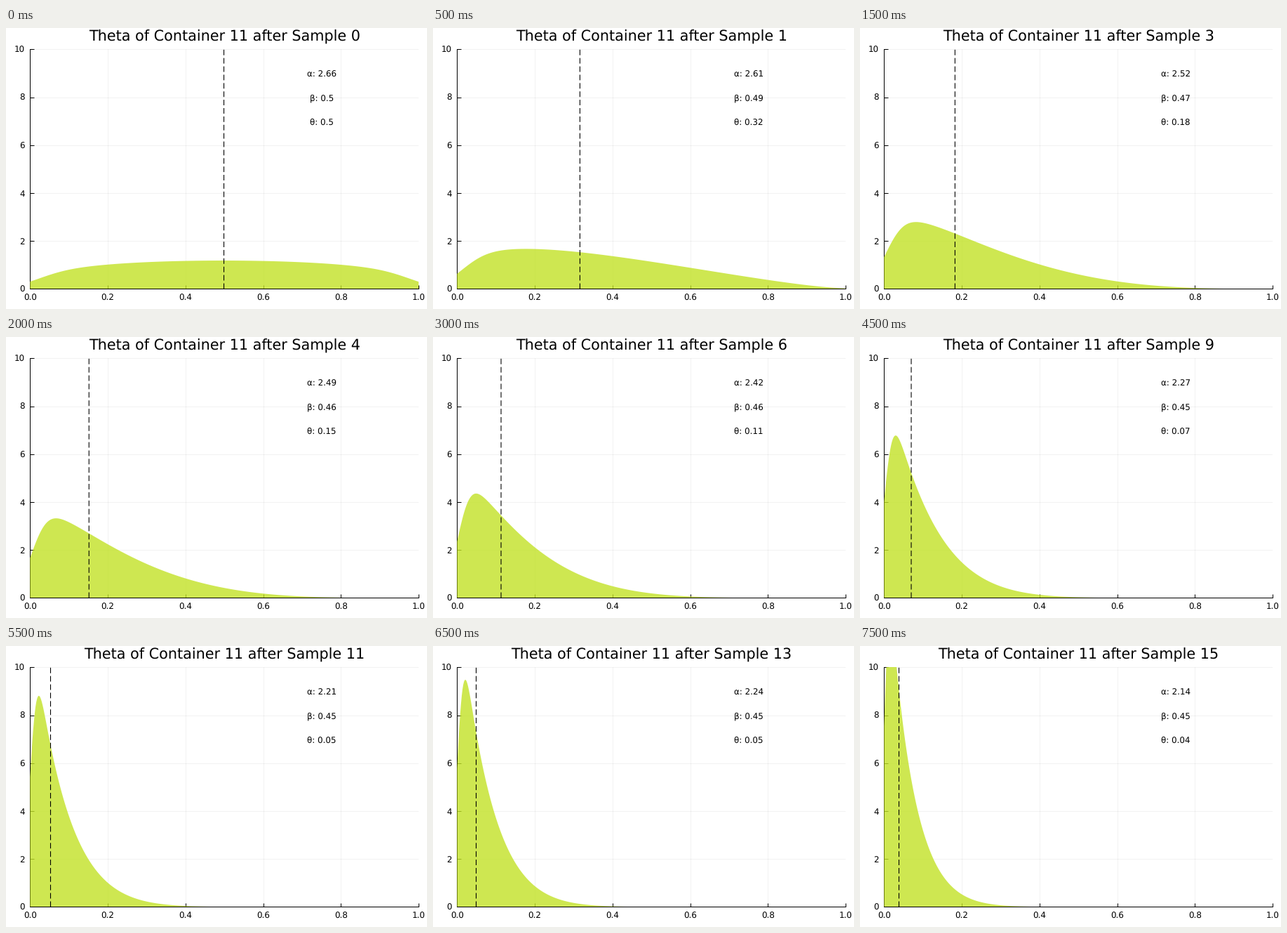
Animation of 600x400 px, one loop 8000 ms. Source, as a matplotlib script:

```python
import numpy as np
import matplotlib.pyplot as plt
from matplotlib.animation import FuncAnimation

W, H, DPI = 600, 400, 100
STEPS, STEP_MS = 16, 500
PT = 72 / DPI  # points per pixel
LEFT, RIGHT, TOP, BOTTOM = 34.3, 588.2, 30.4, 371.4

plt.rcParams.update({
    "font.family": "DejaVu Sans",
    "font.size": 11.85 * PT,
    "text.hinting": "none",
})

# Key points of the parameter estimates; the rest is interpolated.
SAMPLES = [0, 3, 6, 9, 11, 13, 15]
ALPHA = [2.66, 2.52, 2.42, 2.27, 2.21, 2.24, 2.14]
THETA = np.array([0.4987, 0.1825, 0.1132, 0.0699, 0.0527, 0.0491, 0.0383])

BANDWIDTH = 0.21  # kernel width relative to the standard deviation
CELLS = (np.arange(1200) + 0.5) / 1200
X = np.linspace(0, 1, 500)


def params(n):
    alpha = np.interp(n, SAMPLES, ALPHA)
    beta = 0.45 + 0.05 * np.exp(-n / 3)
    theta = 1 / np.interp(n, SAMPLES, 1 / THETA)
    return float(alpha), float(beta), float(theta)


def density(alpha, beta, theta):
    """Kernel-smoothed Beta(a, b) whose median lies at theta."""
    a = alpha * beta
    b = (a - 1 / 3) / theta - a + 2 / 3
    w = CELLS ** (a - 1) * (1 - CELLS) ** (b - 1)
    w /= w.sum()
    mu = w @ CELLS
    h = BANDWIDTH * np.sqrt(w @ (CELLS - mu) ** 2)
    kernel = np.exp(-((X[:, None] - CELLS) / h) ** 2 / 2)
    return kernel @ w / (h * np.sqrt(2 * np.pi))


fig = plt.figure(figsize=(W / DPI, H / DPI), dpi=DPI, facecolor="white")
ax = fig.add_axes([LEFT / W, 1 - BOTTOM / H, (RIGHT - LEFT) / W, (BOTTOM - TOP) / H])
ax.set(xlim=(0, 1), ylim=(0, 10),
       xticks=np.linspace(0, 1, 6), yticks=range(0, 11, 2))
ax.set_axisbelow(True)
ax.grid(color="black", alpha=0.1, lw=0.5 * PT)
ax.spines[["top", "right"]].set_visible(False)
ax.spines[["left", "bottom"]].set_linewidth(PT)
ax.tick_params(direction="in", length=5.5 * PT, width=PT)
ax.tick_params(axis="x", pad=7.3 * PT)
ax.tick_params(axis="y", pad=7.5 * PT)

area, = ax.fill([0, 1, 1], [0, 0, 1], color="#c2e225", alpha=0.8, lw=0, zorder=3)
marker = ax.axvline(0.5, color="black", lw=1.1 * PT, ls=(0, (7.2, 3.6)),
                    snap=False, zorder=4)


def label(x, y, size):
    return fig.text(x / W, 1 - y / H, "", size=size * PT, ha="center", va="baseline")


title = label(311.5, 18.9, 20.75)
notes = [label(449.8, y, 11.85) for y in (69.4, 103.4, 137.4)]


def draw(n):
    values = params(n)
    theta = values[-1]
    area.set_xy(np.column_stack([np.r_[0, X, 1], np.r_[0, density(*values), 0]]))
    marker.set_xdata([theta, theta])
    title.set_text(f"Theta of Container 11 after Sample {n}")
    for note, name, value in zip(notes, "αβθ", values):
        note.set_text(f"{name}: {round(value, 2)}")
    return [area, marker, title, *notes]


anim = FuncAnimation(fig, draw, frames=STEPS, interval=STEP_MS,
                     repeat=True, repeat_delay=0, blit=False)
plt.show()
```
